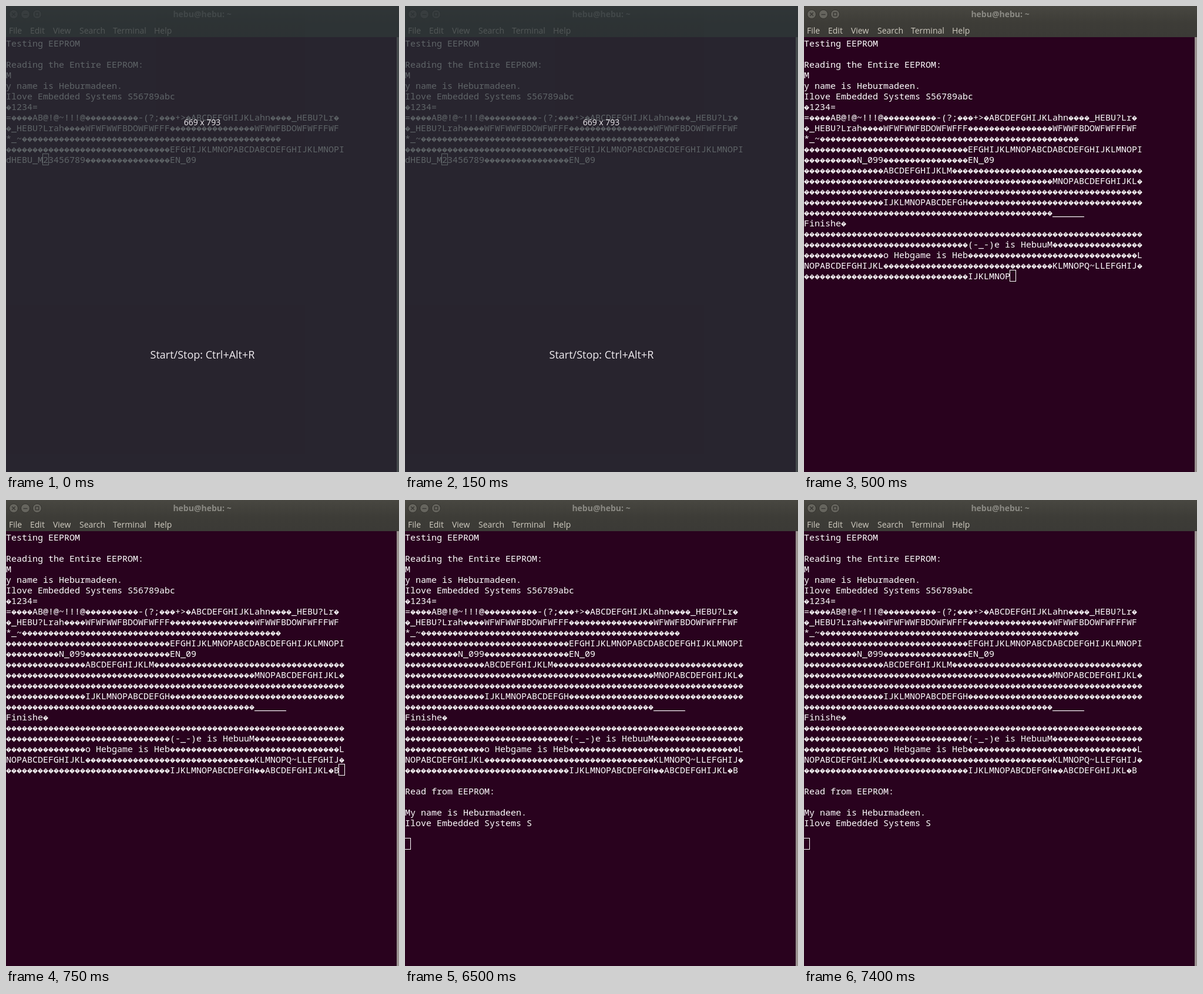
Animation, 669 px wide and 793 px high, one loop 8000 ms. Source, as an HTML page:

```html
<!DOCTYPE html>
<html lang="en">
<head>
<meta charset="utf-8">
<title>Terminal</title>
<style>
  html, body { margin: 0; width: 100%; height: 100%; overflow: hidden; background: #29021e; }
  svg { display: block; width: 669px; height: 793px; }
  text { white-space: pre; }
  .term text { font: 15px "Noto Sans Mono", "Liberation Mono", monospace; fill: #fff; }
  .ui { font: 14px "Open Sans", "Noto Sans", sans-serif; fill: #cfcbc0; }
  .title { font-weight: 700; fill: #8b8a84; text-anchor: middle; }
  .hint { font: 14px "Open Sans", "Noto Sans", sans-serif; fill: #f1edf1; text-anchor: middle; }
  .big { font-size: 18px; }
  .cursor { fill: none; stroke: #fff; }
  .icon { fill: none; stroke: #3a3935; stroke-width: 1.6; }

  .step { animation: 8s step-end infinite; }
  .intro { animation-name: intro; }
  .dump { animation-name: dump; }
  .dump-end { animation-name: dump-end; }
  .more { animation-name: more; }
  .more-end { animation-name: more-end; }
  .full { animation-name: full; }
  .full-end { animation-name: full-end; }
  .read { animation-name: read; }
  @keyframes intro { 0% { opacity: 1 } 3.125%, 100% { opacity: 0 } }
  @keyframes dump { 0% { opacity: 0 } 3.125%, 100% { opacity: 1 } }
  @keyframes dump-end { 0% { opacity: 0 } 3.125% { opacity: 1 } 6.25%, 100% { opacity: 0 } }
  @keyframes more { 0% { opacity: 0 } 6.25%, 100% { opacity: 1 } }
  @keyframes more-end { 0% { opacity: 0 } 6.25% { opacity: 1 } 9.375%, 100% { opacity: 0 } }
  @keyframes full { 0% { opacity: 0 } 9.375%, 100% { opacity: 1 } }
  @keyframes full-end { 0% { opacity: 0 } 9.375% { opacity: 1 } 81.25%, 100% { opacity: 0 } }
  @keyframes read { 0% { opacity: 0 } 81.25%, 100% { opacity: 1 } }
</style>
</head>
<body>
<svg viewBox="0 0 669 793" xmlns="http://www.w3.org/2000/svg">
  <defs>
    <linearGradient id="bar" x2="0" y2="1">
      <stop offset="0" stop-color="#484741"/>
      <stop offset=".55" stop-color="#3d3c37"/>
      <stop offset="1" stop-color="#3b3a36"/>
    </linearGradient>
    <!-- one cell with the replacement character -->
    <pattern id="bad" x="0" y="54" width="9" height="18" patternUnits="userSpaceOnUse">
      <path d="M4.5 6.6 8.9 11 4.5 15.4 .1 11Z" fill="#fff"/>
      <path d="M3.3 9.8Q3.5 8.8 4.5 8.8T5.6 9.9Q5.5 10.6 4.5 11.2V12M4.5 12.8V13.7" fill="none" stroke="#29021e" stroke-width=".9"/>
    </pattern>
  </defs>

  <rect width="669" height="793" fill="#29021e"/>
  <rect width="669" height="53" fill="url(#bar)"/>
  <g fill="#66655e" stroke="#34332f">
    <circle cx="13" cy="14" r="7.5"/>
    <circle cx="33" cy="14" r="7.5"/>
    <circle cx="53" cy="14" r="7.5"/>
  </g>
  <path class="icon" d="M10.2 11.2l5.6 5.6M15.8 11.2l-5.6 5.6M29.5 14.5h7M50.3 11.3h5.4v5.4h-5.4z"/>
  <text class="ui title" x="334" y="19">hebu@hebu: ~</text>
  <g class="ui">
    <text x="5" y="47">File</text>
    <text x="41" y="47">Edit</text>
    <text x="80" y="47">View</text>
    <text x="125" y="47">Search</text>
    <text x="182" y="47">Terminal</text>
    <text x="252" y="47">Help</text>
  </g>
  <rect x="665" y="53" width="4" height="740" fill="#99928f"/>

  <g class="term" id="term"></g>

  <g class="step intro">
    <rect width="669" height="793" fill="#293134" fill-opacity=".75"/>
    <text class="hint" x="334" y="203">669 x 793</text>
    <text class="hint big" x="334.5" y="600">Start/Stop: Ctrl+Alt+R</text>
  </g>
</svg>
<script>
  const COL = 9, ROW = 18, TOP = 54;
  const term = document.getElementById("term");

  function add(parent, tag, attrs, content = "") {
    const el = document.createElementNS("http://www.w3.org/2000/svg", tag);
    for (const key in attrs) el.setAttribute(key, attrs[key]);
    el.textContent = content;
    return parent.appendChild(el);
  }

  // {n} stands for n unreadable bytes
  function line(group, row, col, code) {
    code.split(/\{(\d+)\}/).forEach((part, i) => {
      const y = TOP + row * ROW;
      if (i % 2) {
        add(group, "rect", { x: col * COL, y, width: part * COL, height: ROW, fill: "url(#bad)" });
        col += +part;
      } else if (part) {
        add(group, "text", { x: col * COL, y: y + 15 }, part);
        col += part.length;
      }
    });
  }

  function block(name, lines, cursor) {
    const group = add(term, "g", { class: name && "step " + name });
    for (const [row, col, code] of lines) line(group, row, col, code);
    if (cursor) {
      const [row, col] = cursor;
      add(group, "rect", {
        class: "cursor", x: col * COL - 0.5, y: TOP + row * ROW - 0.5, width: COL + 1, height: ROW + 1
      });
    }
  }

  block("", [
    [0, 0, "Testing EEPROM"],
    [2, 0, "Reading the Entire EEPROM:"],
    [3, 0, "M"],
    [4, 0, "y name is Heburmadeen."],
    [5, 0, "Ilove Embedded Systems S56789abc"],
    [6, 0, "{1}1234="],
    [7, 0, "={4}AB@!@~!!!@{10}-(?;{3}+>{1}ABCDEFGHIJKLahn{4}_HEBU?Lr{1}"],
    [8, 0, "{1}_HEBU?Lrah{4}WFWFWWFBDOWFWFFF{16}WFWWFBDOWFWFFFWF"],
    [9, 0, "*_~{49}"],
    [10, 0, "{31}EFGHIJKLMNOPABCDABCDEFGHIJKLMNOPI"],
    [11, 15, "{16}EN_09"]
  ]);
  block("intro", [[11, 0, "dHEBU_M23456789"]], [11, 7]);
  block("dump", [
    [11, 0, "{10}N_099"],
    [12, 0, "{15}ABCDEFGHIJKLM{36}"],
    [13, 0, "{47}MNOPABCDEFGHIJKL{1}"],
    [14, 0, "{64}"],
    [15, 0, "{15}IJKLMNOPABCDEFGH{33}"],
    [16, 0, "{47}______"],
    [17, 0, "Finishe{1}"],
    [18, 0, "{64}"],
    [19, 0, "{31}(-_-)e is HebuuM{7}"]
  ]);
  block("dump-end", [], [19, 54]);
  block("more", [
    [19, 54, "{10}"],
    [20, 0, "{15}o Hebgame is Heb{32}L"],
    [21, 0, "NOPABCDEFGHIJKL{32}KLMNOPQ~LLEFGHIJ{1}"],
    [22, 0, "{31}IJKLMNOP"]
  ]);
  block("more-end", [], [22, 39]);
  block("full", [[22, 39, "ABCDEFGH{2}ABCDEFGHIJKL{1}B"]]);
  block("full-end", [], [22, 63]);
  block("read", [
    [24, 0, "Read from EEPROM:"],
    [26, 0, "My name is Heburmadeen."],
    [27, 0, "Ilove Embedded Systems S"]
  ], [29, 0]);
</script>
</body>
</html>
```
